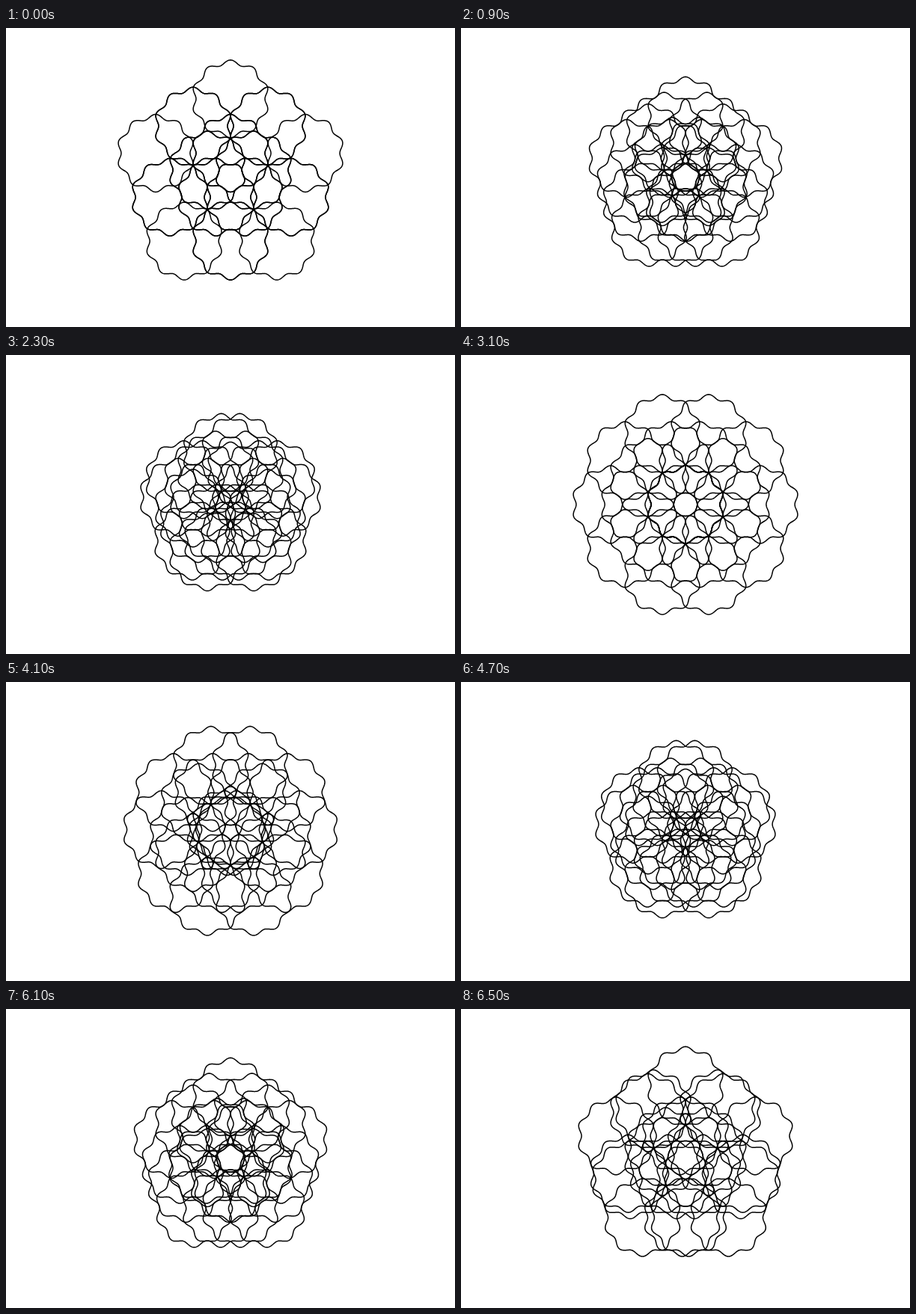
Write an HTML page with a canvas that moves like this. It is 600 px wide and 400 px high and loops after 6.7 s.

```html
<!DOCTYPE html>
<html lang="en">
<head>
<meta charset="utf-8">
<title>Wavy rosette</title>
<style>
  html, body { margin: 0; width: 100%; height: 100%; overflow: hidden; background: #fff; }
  canvas { display: block; }
</style>
</head>
<body>
<canvas id="stage" width="600" height="400"></canvas>
<script>
const ctx = document.getElementById('stage').getContext('2d');
const CENTER = { x: 300, y: 200 };
const REACH = 52.6;   // distance of the clusters from the centre
const RADIUS = 49;    // mean radius of a ring
const WAVE = 3;       // half height of the ripples
const STEPS = 14, STEP_MS = 200, LOOP_MS = 6700;
const OPEN_MS = 500, BACK_MS = 4100;

const pentagon = Array.from({ length: 5 }, (_, i) => {
  const a = -Math.PI / 2 + i * Math.PI * 2 / 5;
  return { x: Math.cos(a), y: Math.sin(a) };
});

// Closed ring with ten ripples
function makeRing(points = 240) {
  const path = new Path2D();
  for (let i = 0; i < points; i++) {
    const a = i / points * Math.PI * 2;
    const r = RADIUS - WAVE * Math.cos(10 * a);
    path.lineTo(r * Math.cos(a), r * Math.sin(a));
  }
  path.closePath();
  return path;
}
const ring = makeRing();

function stepAt(t) {
  if (t < OPEN_MS) return 0;
  if (t < BACK_MS) return Math.min(STEPS, 1 + Math.floor((t - OPEN_MS) / STEP_MS));
  return Math.max(0, STEPS - 1 - Math.floor((t - BACK_MS) / STEP_MS));
}

// Steady collapse, then a slightly accelerating opening on the far side
function spreadAt(step) {
  const u = 1 - 2 * step / STEPS;
  return REACH * (u < 0 ? -Math.pow(-u, 1.08) : u);
}

// Five clusters of five rings; each cluster collapses and opens inside out
function draw(step) {
  const spread = spreadAt(step);
  ctx.setTransform(1, 0, 0, 1, 0, 0);
  ctx.fillStyle = '#fff';
  ctx.fillRect(0, 0, 600, 400);
  ctx.strokeStyle = '#000';
  ctx.lineWidth = 1.5;
  ctx.lineJoin = 'round';
  for (const p of pentagon) {
    for (const q of pentagon) {
      ctx.setTransform(1, 0, 0, 1,
        CENTER.x + REACH * p.x + spread * q.x,
        CENTER.y + REACH * p.y + spread * q.y);
      ctx.stroke(ring);
    }
  }
}

const start = performance.now();
let shown = -1;
function tick() {
  const step = stepAt((performance.now() - start) % LOOP_MS);
  if (step !== shown) draw(shown = step);
  requestAnimationFrame(tick);
}
tick();
</script>
</body>
</html>
```
